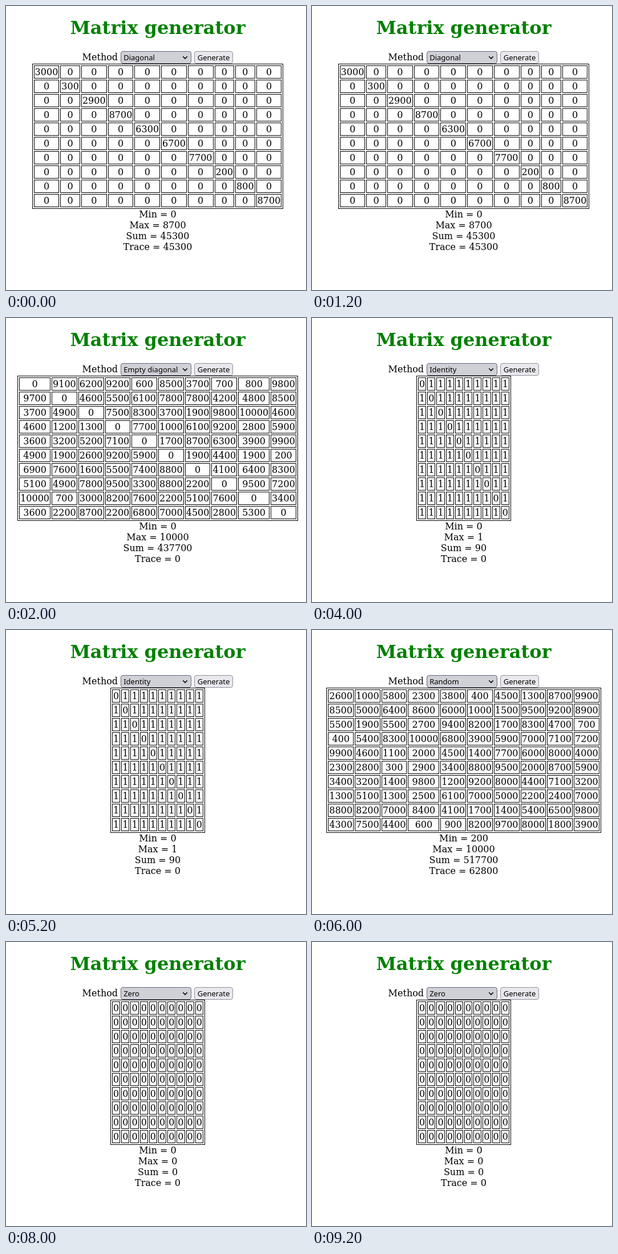
Animation, 526 px wide and 497 px high, one loop 10 s. Source, as an HTML page:

```html
<!DOCTYPE html>
<html lang="en">
<head>
<meta charset="utf-8">
<title>Matrix generator</title>
<style>
  html, body { margin: 0; width: 100%; height: 100%; overflow: hidden; background: #fff; }
  svg { display: block; }
  text { font: 16px "DejaVu Serif", serif; white-space: pre; }
  .mid { text-anchor: middle; }
  .title { font-size: 32px; font-weight: bold; fill: green; }
  .ui { font: 13px "Noto Sans", "Open Sans", sans-serif; }
  .box { fill: none; stroke: #000; shape-rendering: crispEdges; }
  .select { fill: #d0d0d7; stroke: #676774; }
  .button { fill: #e9e9ed; stroke: #8f8f9d; }
  .chevron { fill: none; stroke: #000; stroke-width: 1.6; }
  .view { animation: show 10s step-end infinite; }
  @keyframes show {
    0% { visibility: visible; }
    20%, 100% { visibility: hidden; }
  }
</style>
</head>
<body>
<svg id="stage" width="526" height="497" viewBox="0 0 526 497">
  <text class="title mid" x="266" y="49">Matrix generator</text>
  <text x="133.6" y="95">Method</text>
  <rect class="select" x="201.5" y="79.5" width="123" height="21" rx="3.5"/>
  <path class="chevron" d="M310.3 88.3l3.7 3.7 3.7-3.7"/>
  <rect class="button" x="330.5" y="79.5" width="67" height="21" rx="3.5"/>
  <text class="ui mid" x="364" y="95">Generate</text>
</svg>
<script>
const SIZE = 10, CENTER = 266, TOP = 101;
const DIGIT = 611 / 60;     // advance of one digit
const GAP = 2, EDGE = 4;    // cell spacing; padding plus border of a cell
const ROW = 23, LINE = 19;
const PEAK = 10000;

const stage = document.getElementById("stage");

function add(parent, tag, attrs, text = "") {
  const el = document.createElementNS("http://www.w3.org/2000/svg", tag);
  for (const key in attrs) el.setAttribute(key, attrs[key]);
  el.textContent = text;
  return parent.appendChild(el);
}

function addBox(parent, left, top, right, bottom) {
  const x = Math.round(left), y = Math.round(top);
  add(parent, "rect", {
    class: "box", x: x + 0.5, y: y + 0.5,
    width: Math.round(right) - x - 1, height: Math.round(bottom) - y - 1
  });
}

const addCentered = (parent, x, y, text) => add(parent, "text", { class: "mid", x, y }, text);

const range = [...Array(SIZE).keys()];
const build = rule => range.map(r => range.map(c => rule(r, c)));

// Seeded generator of whole hundreds from 200 to 9900.
function hundreds(seed) {
  return () => {
    seed = (seed * 1664525 + 1013904223) % 2 ** 32;
    return 100 * (2 + Math.floor(seed / 2 ** 32 * 98));
  };
}

// Random matrix that reaches the peak value at the given [row, column] cells.
function randomMatrix(seed, peaks) {
  const next = hundreds(seed);
  const matrix = build(next);
  for (const [r, c] of peaks) matrix[r][c] = PEAK;
  return matrix;
}

const diagonal = [3000, 300, 2900, 8700, 6300, 6700, 7700, 200, 800, 8700];
const filled = randomMatrix(7, [[8, 0], [2, 8]]);

const views = [
  { method: "Diagonal", matrix: build((r, c) => r === c ? diagonal[r] : 0),
    stats: { Min: 0, Max: 8700, Sum: 45300, Trace: 45300 } },
  { method: "Empty diagonal", matrix: build((r, c) => r === c ? 0 : filled[r][c]),
    stats: { Min: 0, Max: PEAK, Sum: 437700, Trace: 0 } },
  { method: "Identity", matrix: build((r, c) => r === c ? 0 : 1),
    stats: { Min: 0, Max: 1, Sum: 90, Trace: 0 } },
  { method: "Random", matrix: randomMatrix(42, [[3, 3]]),
    stats: { Min: 200, Max: PEAK, Sum: 517700, Trace: 62800 } },
  { method: "Zero", matrix: build(() => 0),
    stats: { Min: 0, Max: 0, Sum: 0, Trace: 0 } }
];

function drawTable(parent, matrix) {
  const widths = range.map(c =>
    Math.max(...matrix.map(row => String(row[c]).length)) * DIGIT + EDGE);
  const total = widths.reduce((a, b) => a + b) + GAP * (SIZE + 1) + 2;
  const height = SIZE * (ROW + GAP) + GAP + 2;
  const left = CENTER - total / 2;
  addBox(parent, left, TOP, left + total, TOP + height);

  let x = left + 1 + GAP;
  widths.forEach((width, c) => {
    matrix.forEach((row, r) => {
      const y = TOP + 1 + GAP + r * (ROW + GAP);
      addBox(parent, x, y, x + width, y + ROW);
      addCentered(parent, x + width / 2, y + 17, row[c]);
    });
    x += width + GAP;
  });
  return TOP + height;
}

function drawStats(parent, stats, top) {
  Object.entries(stats).forEach(([name, value], i) =>
    addCentered(parent, CENTER, top + 15 + i * LINE, `${name} = ${value}`));
}

views.forEach(({ method, matrix, stats }, i) => {
  const view = add(stage, "g", { class: "view", style: `animation-delay: ${i * 2 - 10}s` });
  add(view, "text", { class: "ui", x: 206.2, y: 95 }, method);
  drawStats(view, stats, drawTable(view, matrix));
});
</script>
</body>
</html>
```
